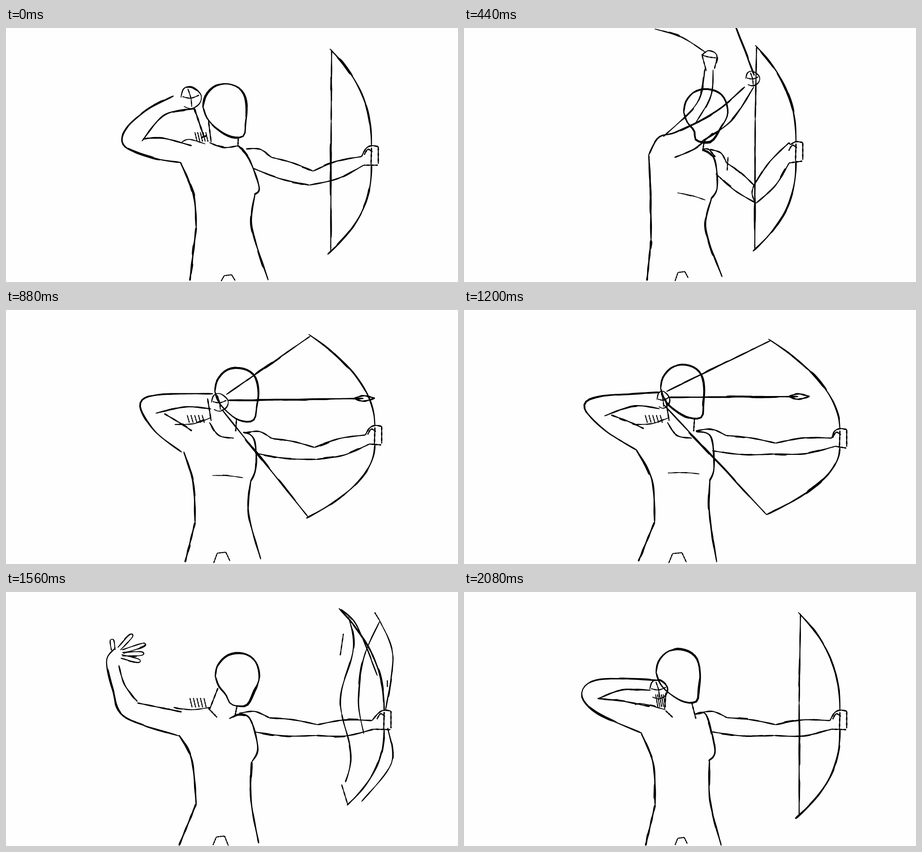
Write an HTML page that moves like this. It is 998 px wide and 561 px high and loops after 2160 ms.

```html
<!DOCTYPE html>
<html lang="en">
<head>
<meta charset="utf-8">
<title>Archer</title>
<style>
html, body { margin: 0; width: 100%; height: 100%; overflow: hidden; background: #fefefe; }
svg { display: block; width: 100%; height: 100%; }
path { fill: #000; }
</style>
</head>
<body>
<svg viewBox="0 0 998 561"><path id="ink"/></svg>
<script>
const LOOP = 2160, N = 40;
const STEPS = [0, 160, 240, 280, 360, 400, 440, 520, 600, 680, 720, 800, 880, 1040, 1200,
  1440, 1480, 1520, 1560, 1600, 1640, 1720, 1760, 1800, 1840, 1920, 2000, 2080];
const WEIGHT = { head: 3.8, neck: 3.2, quiver: 2.5, arm: 3.4, hand: 2.6, side: 4.2, front: 3.8,
  lead: 3.2, bow: 3.6, string: 3.2, arrow: 3.8, crotch: 2.6, fold: 2.2, extra: 2.8 };

const lerp = (a, b, k) => a + (b - a) * k;
const mix = (p, q, k) => p.map((v, i) => lerp(v, q[i], k));
const add = (p, x, y) => [p[0] + x, p[1] + y];
const range = (n, f) => Array.from({ length: n }, (_, i) => f(i));
const rand = n => { const v = Math.sin(n * 12.9898) * 43758.5453; return v - Math.floor(v); };
const parse = s => s ? s.split('/').map(l => l.trim().split(' ').map(p => p.split(',').map(Number))) : [];
const shift = (s, dx, dy) => s.replace(/(-?\d+),(-?\d+)/g, (_, x, y) => `${+x + dx},${+y + dy}`);
const segments = pts => pts.slice(1).map((p, i) => [pts[i], p]);

// Unit normal of a line.
function normal(a, b) {
  const dx = b[0] - a[0], dy = b[1] - a[1], len = Math.hypot(dx, dy) || 1;
  return [-dy / len, dx / len];
}

function arc(a, b, h) {
  const [nx, ny] = normal(a, b);
  return [a, add(mix(a, b, .5), nx * h, ny * h), b];
}

// Each key pose holds a few points per part; builders turn them into strokes.
const build = {
  head([[[x, y], chin]]) {
    const w = 97, h = 119, c = (chin[0] - x) / w;
    return [[[0, .45], [.05, .24], [.24, .06], [.5, 0], [.78, .06], [.95, .22], [1, .48], [(1 + c) / 2, .74],
      [c, .95], [c - .15, 1], [c - .4, .95], [.24, .78], [.08, .62], [0, .43]].map(([u, v]) => [x + u * w, y + v * h])];
  },
  quiver([[a, b], ...rest]) {
    const hatch = range(5, i => { const x = lerp(a[0], b[0], i / 4); return [[x, a[1]], [x + 5, b[1]]]; });
    return [...hatch, ...rest];
  },
  hand([pts]) {
    const [a, b] = pts;
    if (pts.length === 2)
      return [
        [[0, .5], [.15, .08], [.55, 0], [1, .35], [.95, .75], [.55, 1], [.15, .9]],
        [[.08, .45], [.5, .52], [.92, .38]],
        [[.35, .08], [.5, .5], [.55, .92]]
      ].map(l => l.map(([u, v]) => [lerp(a[0], b[0], u), lerp(a[1], b[1], v)]));
    return pts.slice(1).map(tip => {
      const [nx, ny] = normal(a, tip), root = mix(a, tip, .3);
      return [add(root, nx * 4, ny * 4), add(tip, nx * 4, ny * 4), add(tip, -nx * 4, -ny * 4), add(root, -nx * 4, -ny * 4)];
    });
  },
  lead([[s, e, w], [s2, e2, w2]], pose) {
    const g = parse(pose.bow)[0][1], mid = mix(s, e, .38);
    return [
      arc(s, mid, -9), arc(mid, e, -3), arc(e, w, -6), arc(s2, e2, 5), arc(e2, w2, 8),
      [w, add(g, -12, 4), add(g, 0, -2), add(g, 15, 0)],
      [add(g, 15, 0), add(g, 15, 38)],
      [w2, add(g, 14, 41)],
      [add(g, 0, 2), add(g, -1, 40)],
      [add(g, -16, 18), add(g, -8, 6), add(g, 2, 12)]
    ];
  },
  bow([[top, grip, end]]) {
    const power = 2.35 - (454 - (end[1] - top[1])) / 180;
    const limb = (tip, g) => range(9, i => {
      const v = i / 8;
      return [lerp(tip[0], g[0], 1 - (1 - v) ** power), lerp(tip[1], g[1], v)];
    });
    return [limb(top, grip), limb(end, add(grip, 0, 40))];
  },
  string(lines, { wave = 0 }) {
    return lines.map(([a, b]) => range(13, i => {
      const [x, y] = mix(a, b, i / 12);
      return [x + wave * Math.sin((y - 50) / 255 * 2 * Math.PI), y];
    }));
  },
  arrow([[tail, head]]) {
    const len = Math.hypot(head[0] - tail[0], head[1] - tail[1]);
    const size = len > 200 ? 46 : 0, back = mix(head, tail, size / len), mid = mix(head, tail, size * .55 / len);
    const [nx, ny] = normal(tail, head);
    return [[tail, mid], ...[6, -6].map(r => [back, add(mid, nx * r, ny * r), head])];
  },
  crotch([[a, b]]) {
    return segments([[a[0], 559], [lerp(a[0], b[0], .22), a[1] + 2], [lerp(a[0], b[0], .75), a[1]], b]);
  },
  fold: ([[a, b]]) => [arc(a, b, -2)]
};

const reach = {
  head: '435,123 526,234',
  neck: '447,205 453,252 / 513,240 512,262 / 449,253 480,264 513,260',
  quiver: '417,230 441,251 / 388,252 405,246 440,256',
  arm: '370,150 310,182 263,225 262,262 330,288 385,297 / 300,250 350,192 418,178 / 302,245 345,243 410,260',
  hand: '386,130 430,178',
  side: '385,296 414,368 420,440 / 420,440 406,558',
  front: '513,260 537,290 559,352 548,368 / 550,365 543,440 579,557',
  lead: '530,267 678,316 785,284 / 546,310 670,347 790,303',
  bow: '715,46 807,262 710,500',
  string: '719,48 718,205 / 718,205 717,492',
  arrow: '416,178 437,240',
  crotch: '475,545 506,558',
  fold: '', extra: ''
};

const raise = {
  arm: '365,70 300,140 270,205 285,255 365,288 400,315 / 395,75 340,150 330,215 / 325,212 375,245 410,258',
  hand: shift(reach.hand, -18, -88),
  arrow: '392,70 320,300'
};

const over = {
  arm: '455,70 410,150 398,215 407,280 / 485,75 460,150 455,210 / 450,205 470,235',
  hand: shift(reach.hand, 68, -95),
  arrow: '470,50 150,30', extra: ''
};

const swing = {
  head: '485,134 551,250',
  neck: '530,252 527,272 / 527,268 540,268 555,285',
  quiver: '',
  arm: '620,130 555,185 470,229 430,242 408,280 / 640,130 590,205 525,250 / 550,232 510,266 465,286',
  hand: '622,96 652,128',
  arrow: '641,105 540,-160',
  side: '408,280 412,370 413,468 / 413,468 404,558',
  front: '527,268 553,290 559,352 545,378 / 547,374 534,445 570,550',
  lead: '543,268 640,347 718,253 / 556,322 645,387 718,298',
  bow: '643,38 733,253 638,493',
  string: '646,42 643,200 / 643,200 642,490',
  crotch: '466,538 495,552',
  fold: '471,364 533,380',
  extra: '532,90 515,165 440,240 / 550,92 545,150 510,212 / 525,60 540,50 558,60 553,90 / 525,58 535,95 / ' +
    '526,60 540,64 556,66 / 421,2 480,20 535,55 / 640,347 636,365 642,385 / 583,285 581,315'
};

const pull = {
  head: '488,135 571,250',
  neck: '545,253 534,275 / 521,278 535,274 540,258',
  quiver: '443,237 472,264 / 415,262 425,262 437,273 / 437,271 475,263 493,222',
  arm: '492,188 380,184 338,205 355,268 405,318 / 362,222 430,216 485,219 / 385,226 435,272',
  hand: '492,190 537,230',
  arrow: '538,206 877,199',
  side: '405,318 412,400 414,470 / 414,470 406,559',
  front: '535,272 550,285 553,345 538,380 / 538,380 529,450 567,544',
  lead: '545,275 674,313 775,269 / 552,321 685,342 785,291',
  bow: '664,43 799,250 658,468',
  string: '667,48 525,194 / 512,230 666,462',
  crotch: '465,534 498,552',
  fold: '461,371 527,379'
};

const nock = {
  arm: '612,190 500,212 420,235 408,280 406,318 / 615,215 530,236 460,250 / 465,255 480,275',
  hand: shift(pull.hand, 100, 0),
  arrow: shift(pull.arrow, 66, -2),
  string: '657,45 632,195 / 632,205 653,478', extra: ''
};

const full = {
  head: '434,121 526,235',
  neck: '445,195 453,245 / 509,240 507,268 / 449,248 470,277 503,283',
  quiver: '400,232 433,249 / 372,253 415,251 452,238',
  arm: '433,182 300,191 266,215 310,265 382,310 / 310,234 375,212 432,218 / 325,232 365,247 397,262',
  hand: '426,180 453,217',
  arrow: '450,193 763,191',
  side: '380,308 415,375 421,468 / 421,468 385,555',
  front: '512,268 545,280 552,348 542,378 / 543,372 542,450 558,557',
  lead: '512,267 688,294 812,283 / 548,311 685,318 820,301',
  bow: '672,64 830,264 668,452',
  string: '676,68 447,180 / 440,208 668,452',
  crotch: '452,536 491,557',
  fold: '450,360 520,362', extra: ''
};

const settle = { ...full };
for (const part of ['arm', 'hand', 'arrow']) settle[part] = shift(full[part], -11, 0);

const loose = { string: '690,60 735,190 / 735,190 690,457', arrow: shift(full.arrow, 230, 0), extra: '' };
const fly = { arrow: shift(full.arrow, 380, 0) };

const recoil = {
  head: '462,134 535,250',
  neck: '468,212 450,258 / 510,252 506,272 / 447,257 466,277',
  quiver: '406,234 437,255 / 370,255 410,260 450,255',
  arm: '240,125 222,152 235,215 262,276 382,318 / 249,162 262,205 290,242 / 290,245 388,265',
  hand: '238,138 234,107 276,97 303,117 299,136 292,152',
  side: '382,316 410,370 420,468 / 420,468 382,560',
  front: '493,280 515,270 540,282 556,345 543,375 / 542,375 541,460 558,555',
  lead: '515,268 688,293 808,284 / 548,309 685,317 812,303',
  bow: '735,36 835,263 753,471',
  string: '754,55 752,270 / 752,270 745,420', wave: 14,
  crotch: '457,539 491,560',
  arrow: '', fold: '',
  extra: '740,38 775,75 820,185 / 814,45 825,63 / 825,63 854,140 838,262 / 825,65 790,145 778,240 790,313 / ' +
    '843,300 851,378 785,463 / 741,425 755,471 / 745,92 738,140 / 842,195 842,210'
};

const follow = {
  head: '457,128 537,248',
  neck: '463,208 448,257 / 511,248 508,268 / 450,257 463,273',
  quiver: '409,236 436,255 / 385,254 410,258 445,257',
  arm: '128,215 165,239 285,242 350,285 387,318 / 165,215 205,221 285,210 315,212 / 315,212 345,225 398,265',
  hand: '155,220 128,200 138,180 176,133 189,152 168,184',
  side: '386,317 411,390 414,488 / 414,488 392,560',
  front: '508,268 540,280 556,345 543,375 / 543,375 538,460 560,558',
  lead: recoil.lead,
  bow: '738,47 831,263 720,508',
  string: '745,60 745,265 / 745,265 740,485', wave: -12,
  crotch: '461,541 490,558',
  extra: '806,75 830,140 836,242 / 834,318 830,400 805,490 / 738,198 736,222 / 745,293 744,330 / 730,408 729,438'
};

const rest = {
  head: '424,126 516,242',
  neck: '446,222 443,258 / 503,245 512,280 / 445,262 461,277',
  quiver: '423,226 440,254 / 377,249 395,247 445,260',
  arm: '430,195 300,193 260,222 290,265 393,312 / 295,236 350,216 412,217 / 295,235 350,241 410,253',
  hand: '410,195 449,236',
  side: '391,311 418,380 422,470 / 422,470 401,560',
  front: '510,270 535,272 554,350 540,373 / 542,370 543,460 568,560',
  lead: recoil.lead,
  bow: '738,45 830,263 732,501',
  string: '743,48 740,245 / 740,245 740,495',
  crotch: '466,542 493,556', extra: ''
};

const lift = {
  ...rest,
  arm: '290,105 262,180 270,250 300,270 393,312 / 325,110 300,185 305,215 / 303,215 365,245 410,253',
  hand: shift(rest.hand, -110, -130)
};

const POSES = [
  [0, reach], [280, raise], [360, { arrow: '420,50 14,140' }], [400, over], [440, swing],
  [520, { extra: '', arrow: '645,150 830,-60' }], [600, nock], [720, pull],
  [1040, settle], [1200, full], [1400, full], [1440, loose], [1480, fly],
  [1560, recoil], [1760, follow], [1920, lift], [2080, rest]
];

const spline = (a, b, c, d, t) => b + .5 * t * (c - a + t * (2 * a - 5 * b + 4 * c - d + t * (3 * (b - c) + d - a)));

// Smooth curve through the points, resampled at equal distances.
function sample(pts) {
  const at = i => pts[Math.max(0, Math.min(pts.length - 1, i))];
  const fine = [], dist = [0];
  for (let i = 0; i < pts.length - 1; i++)
    for (let j = 0; j < 12; j++)
      fine.push([0, 1].map(n => spline(at(i - 1)[n], at(i)[n], at(i + 1)[n], at(i + 2)[n], j / 12)));
  fine.push(at(pts.length));
  for (let i = 1; i < fine.length; i++)
    dist.push(dist[i - 1] + Math.hypot(fine[i][0] - fine[i - 1][0], fine[i][1] - fine[i - 1][1]));
  let i = 1;
  return range(N + 1, n => {
    const d = dist[dist.length - 1] * n / N;
    while (i < fine.length - 1 && dist[i] < d) i++;
    return mix(fine[i - 1], fine[i], (d - dist[i - 1]) / (dist[i] - dist[i - 1] || 1));
  });
}

function strokes(name, pose) {
  const lines = parse(pose[name]);
  return (lines.length && build[name] ? build[name](lines, pose) : lines).map(sample);
}

const tracks = Object.keys(WEIGHT).map(name => ({
  weight: WEIGHT[name],
  keys: POSES.filter(([, pose]) => name in pose).map(([t, pose]) => ({ t, lines: strokes(name, pose) }))
}));

// Matching strokes blend; others switch halfway.
function linesAt(keys, t) {
  const i = keys.filter(k => k.t <= t).length - 1;
  const a = keys[i], b = keys[i + 1];
  if (!b) return a.lines;
  const k = (t - a.t) / (b.t - a.t);
  if (a.lines.length !== b.lines.length) return (k < .5 ? a : b).lines;
  return a.lines.map((line, n) => line.map((p, j) => mix(p, b.lines[n][j], k)));
}

// Tapered brush stroke with uneven pressure.
function ribbon(line, weight, seed) {
  const left = [], right = [], last = line.length - 1;
  line.forEach(([x, y], i) => {
    const [nx, ny] = normal(line[Math.max(0, i - 1)], line[Math.min(last, i + 1)]);
    const r = weight * (1 + .2 * Math.sin(i * .5 + seed)) * (i % last ? .5 : .3);
    left.push((x + nx * r).toFixed(1) + ' ' + (y + ny * r).toFixed(1));
    right.unshift((x - nx * r).toFixed(1) + ' ' + (y - ny * r).toFixed(1));
  });
  return 'M' + left.concat(right).join('L') + 'Z';
}

// One line, then short retraced bits beside it on longer lines.
function sketch(line, weight, seed) {
  const length = line.slice(1).reduce((sum, p, i) => sum + Math.hypot(p[0] - line[i][0], p[1] - line[i][1]), 0);
  const bits = range(Math.floor(length / 55), i => {
    const from = Math.floor(rand(seed + i) * (N - 10)), off = rand(seed + i + 50) * 3 - 1.5;
    const [nx, ny] = normal(line[from], line[from + 8]);
    return ribbon(line.slice(from, from + 9).map(p => add(p, nx * off, ny * off)), weight * .9, seed + i);
  });
  return ribbon(line, weight * .85, seed) + bits.join('');
}

const ink = document.getElementById('ink');
let shown = -1;

function draw(now) {
  const step = STEPS.filter(s => s <= now % LOOP).pop();
  if (step === shown) return;
  shown = step;
  ink.setAttribute('d', tracks.map(({ keys, weight }, n) =>
    linesAt(keys, step).map((line, i) => sketch(line, weight, n * 17 + i * 3 + step)).join('')).join(''));
}

const start = performance.now();
(function tick() {
  draw(performance.now() - start);
  requestAnimationFrame(tick);
})();
</script>
</body>
</html>
```
